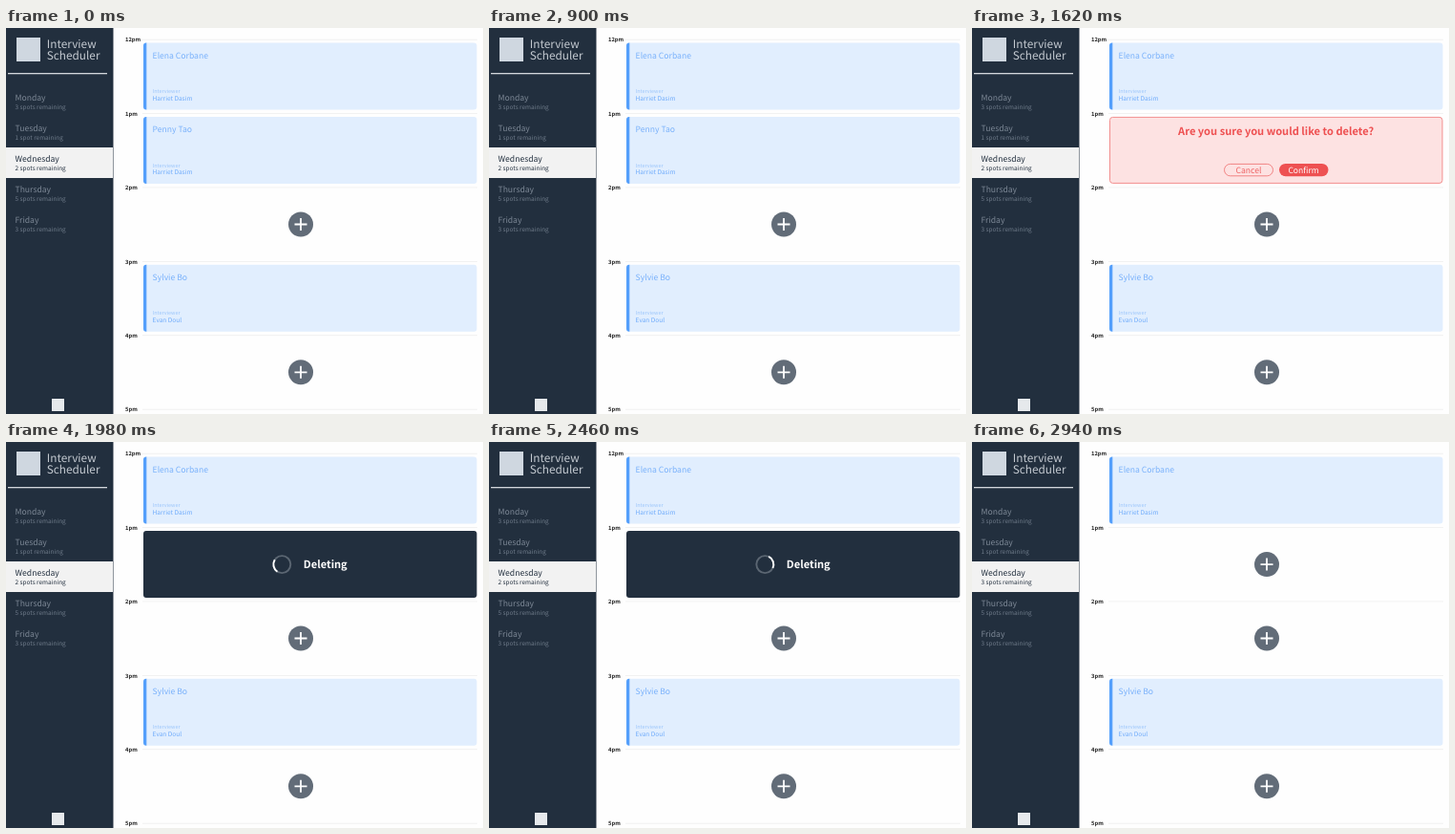
Recreate the animation shown at these times as an HTML page. Size 500 by 404 pixels, loop 3300 ms.

```html
<!DOCTYPE html>
<html lang="en">
<head>
<meta charset="utf-8">
<title>Interview Scheduler</title>
<style>
  html, body { margin: 0; width: 100%; height: 100%; overflow: hidden; background: #fefefe; }
  svg { display: block; width: 500px; height: 404px; }
  text {
    font: 8.6px "Noto Sans CJK SC", "Noto Sans CJK JP", "Noto Sans CJK", "Noto Sans", sans-serif;
    text-rendering: geometricPrecision;
  }
  .brand { font-size: 11.8px; font-weight: 300; fill: #c3c9d0; }
  .day { fill: #7d8896; }
  .spots { font-size: 6.45px; font-weight: 300; fill: #6f7b8a; }
  .selected text { fill: #222f3e; }
  .hour { font-size: 5.8px; font-weight: 700; fill: #222; }
  .card { fill: #e1eefe; }
  .bar { fill: #549ffb; }
  .name { fill: #79b1fb; }
  .label { font-size: 5.45px; font-weight: 300; fill: #9cc6fb; }
  .person { font-size: 6.55px; font-weight: 500; fill: #6eabfb; }
  .icons { display: none; fill: none; stroke: #eaf3ff; stroke-width: 1; stroke-linejoin: round; }
  .hover .card, .hover .bar { fill: #509dff; }
  .hover .name, .hover .person { fill: #e6f1ff; }
  .hover .label { fill: #a5cdff; }
  .hover .icons { display: inline; }
  .message { font-size: 11.1px; font-weight: 600; }
</style>
</head>
<body>
<svg id="stage" viewBox="0 0 500 404"></svg>
<script>
const LOOP = 3300;
const HOVER_JENNY = 960, CONFIRM = 1620, DELETING = 1860, DONE = 2940;
const LOUISE_IN = 2040, LOUISE_OUT = 2400;
const slotTop = i => 15.5 + 77.4 * i;

const text = (x, y, cls, content, extra = '') =>
  `<text x="${x}" y="${y}" class="${cls}" ${extra}>${content}</text>`;

const rect = (x, y, w, h, attrs) =>
  `<rect x="${x}" y="${y}" width="${w}" height="${h}" ${attrs}/>`;

const slot = (i, id, content) =>
  `<g id="${id}" transform="translate(0 ${slotTop(i)})">${content}</g>`;

function day(name, spots, i) {
  const selected = i === 2;
  return `<g transform="translate(0 ${61 + 32 * i})" class="${selected ? 'selected' : ''}">
    ${selected ? rect(0, 0, 112, 32, 'fill="#f2f2f2" y="64"') .replace(' y="64"', '') : ''}
    ${text(9.5, 15, 'day', name)}
    ${text(9.5, 24, 'spots', spots, selected ? 'id="spots"' : '')}</g>`;
}

const hour = (label, i) =>
  text(125, 14.3 + 77.4 * i, 'hour', label) +
  rect(143, 11.8 + 77.4 * i, 351, 0.7, 'fill="#ececec"');

const booking = (i, id, student, interviewer) => slot(i, id, `
  ${rect(144, 0, 349.5, 70, 'rx="3" class="card"')}
  <path class="bar" d="M147.3 0v70h-.3a3 3 0 0 1-3-3v-64a3 3 0 0 1 3-3z"/>
  ${text(153.6, 16, 'name', student)}
  ${text(153.6, 52.8, 'label', 'Interviewer')}
  ${text(153.6, 60.4, 'person', interviewer)}
  <g class="icons">
    <path d="M467.5 53.5h-6v8h8v-4M464.5 59l.5-2.2 5-5 1.8 1.8-5 5z"/>
    <path d="M475.5 53.5h8.5M478 53.3v-1.5h3.6v1.5M476.5 53.5l.4 8h5.8l.4-8M478.6 55.5v4.3M481 55.5v4.3"/>
  </g>`);

const plus = (i, id) => slot(i, id, `
  <circle cx="309" cy="35.2" r="13" fill="#626c78"/>
  <path d="M302.5 35.2h13M309 28.7v13" stroke="#fff" stroke-width="1.8"/>`);

const confirmCard = slot(1, 'confirm', `
  ${rect(144.5, 0.5, 348.5, 69, 'rx="3" fill="#fde2e2" stroke="#f28f8f"')}
  ${text(318.7, 19.5, 'message', 'Are you sure you would like to delete?', 'text-anchor="middle" fill="#ee5152"')}
  ${rect(264.5, 49.5, 51, 12.4, 'rx="6.2" fill="none" stroke="#f07a7a" stroke-width=".9"')}
  ${rect(322, 49, 51.5, 13.4, 'rx="6.7" fill="#ee5152"')}
  ${text(290, 58.8, '', 'Cancel', 'text-anchor="middle" fill="#ee6263"')}
  ${text(347.6, 58.8, '', 'Confirm', 'text-anchor="middle" fill="#fff"')}`);

const deletingCard = slot(1, 'deleting', `
  ${rect(144, 0, 349.5, 70, 'rx="3" fill="#222f3e"')}
  <g transform="translate(289.3 35.2)" fill="none" stroke-width="1.9">
    <circle r="9" stroke="#5b6672"/>
    <path id="spinner" d="M-6.36 -6.36A9 9 0 0 1 6.36 -6.36" stroke="#fff"/>
  </g>
  ${text(311.8, 39.2, 'message', 'Deleting', 'fill="#fff"')}`);

const days = [
  ['Monday', '3 spots remaining'], ['Tuesday', '1 spot remaining'],
  ['Wednesday', '2 spots remaining'], ['Thursday', '5 spots remaining'],
  ['Friday', '3 spots remaining']
];
const hours = ['12pm', '1pm', '2pm', '3pm', '4pm', '5pm'];

document.getElementById('stage').innerHTML = `
  ${rect(0, 0, 500, 404, 'fill="#fefefe"')}
  ${rect(0, 0, 112.5, 404, 'fill="#222f3e"')}
  ${rect(11, 10, 25, 25, 'fill="#cfd7e0"')}
  ${text(42.8, 21, 'brand', 'Interview')}
  ${text(42.8, 32.6, 'brand', 'Scheduler')}
  ${rect(2, 47, 104, 1.3, 'fill="#d3d7dc"')}
  ${days.map(([name, spots], i) => day(name, spots, i)).join('')}
  ${rect(48, 388, 13, 13, 'fill="#e6e9ec"')}
  ${hours.map(hour).join('')}
  ${booking(0, 'first', 'Elena Corbane', 'Harriet Dasim')}
  ${booking(1, 'second', 'Penny Tao', 'Harriet Dasim')}
  ${booking(3, 'third', 'Sylvie Bo', 'Evan Doul')}
  ${plus(1, 'freed')}${plus(2, 'add2')}${plus(4, 'add4')}
  ${confirmCard}${deletingCard}`;

const el = id => document.getElementById(id);
const show = (id, on) => { el(id).style.display = on ? '' : 'none'; };

function render(t) {
  show('second', t < CONFIRM);
  show('confirm', t >= CONFIRM && t < DELETING);
  show('deleting', t >= DELETING && t < DONE);
  show('freed', t >= DONE);
  el('second').classList.toggle('hover', t >= HOVER_JENNY);
  el('third').classList.toggle('hover', t >= LOUISE_IN && t < LOUISE_OUT);
  el('spots').textContent = `${t < DONE ? 2 : 3} spots remaining`;
  el('spinner').setAttribute('transform', `rotate(${(t - 2160) * 0.36 - 38})`);
}

function tick() {
  render(performance.now() % LOOP);
  requestAnimationFrame(tick);
}
tick();
</script>
</body>
</html>
```
